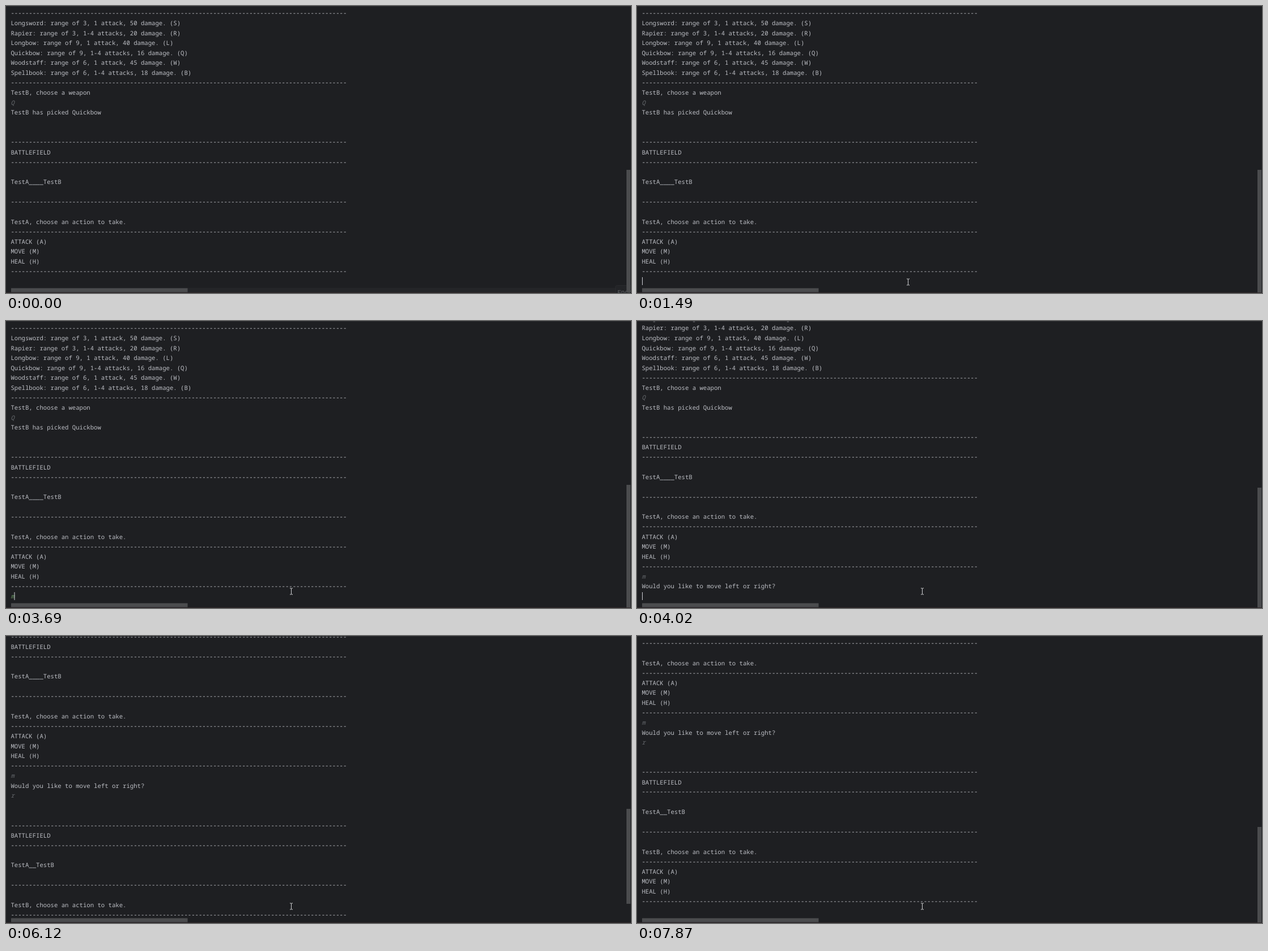
Write an HTML page that moves like this. It is 1103 px wide and 508 px high and loops after 8 s.

```html
<!DOCTYPE html>
<html lang="en">
<head>
<meta charset="utf-8">
<title>Console battle</title>
<style>
  html, body { margin: 0; width: 100%; height: 100%; overflow: hidden; background: #1e1f22; }
  svg { display: block; width: 1103px; height: 508px; }
  #log text { font: 10.64px "Noto Sans Mono", "DejaVu Sans Mono", monospace; fill: #bcbec4; text-rendering: geometricPrecision; }
  #log .echo { font-style: italic; fill: #66696d; }
  #log .typing { fill: #6a9a63; }
  .thumb { fill: #4b4c4e; }
</style>
</head>
<body>
<svg viewBox="0 0 1103 508">
  <g id="log"></g>
  <rect width="1103" height="1" fill="#2a2b2e"/>
  <rect y="507" width="1103" height="1" fill="#30282a"/>
  <g id="hint">
    <rect x="9" y="499" width="1086" height="8" fill="#242528"/>
    <rect x="1075.5" y="494.5" width="40" height="20" rx="3" fill="#232427" stroke="#292a2d"/>
    <text x="1079" y="511" font-family="Inter, sans-serif" font-size="11" fill="#5a5c60">Enco</text>
  </g>
  <rect class="thumb" x="9" y="499.5" width="311.5" height="7"/>
  <rect class="thumb" id="bar" x="1095" width="7"/>
  <rect id="caret" y="480" width="1" height="14" fill="#ced0d6"/>
  <path id="mouse" d="M-2.5-5.5h2l.5.5.5-.5h2M0-5V5M-2.5 5.5h2L0 5l.5.5h2" fill="none" stroke="#d2d3d5"/>
</svg>
<script>
const LOOP = 8000, ROW = 17.58, BASE = 16.4, LEFT = 8.4;
const $ = id => document.getElementById(id);
const rule = "-".repeat(93);

const field = (gap, player) => [
  "", "", rule, "BATTLEFIELD", rule, "", "TestA" + "_".repeat(gap) + "TestB", "", rule, "",
  player + ", choose an action to take.", rule, "ATTACK (A)", "MOVE (M)", "HEAL (H)", rule
];
const lines = [
  rule,
  "Longsword: range of 3, 1 attack, 50 damage. (S)",
  "Rapier: range of 3, 1-4 attacks, 20 damage. (R)",
  "Longbow: range of 9, 1 attack, 40 damage. (L)",
  "Quickbow: range of 9, 1-4 attacks, 16 damage. (Q)",
  "Woodstaff: range of 6, 1 attack, 45 damage. (W)",
  "Spellbook: range of 6, 1-4 attacks, 18 damage. (B)",
  rule, "TestB, choose a weapon", "Q", "TestB has picked Quickbow",
  ...field(4, "TestA"),
  "m", "Would you like to move left or right?", "r",
  ...field(2, "TestB")
];

const rows = lines.map((line, i) => {
  const el = document.createElementNS("http://www.w3.org/2000/svg", "text");
  el.textContent = line;
  el.setAttribute("x", LEFT);
  el.setAttribute("y", BASE + i * ROW - (line === rule ? 0.6 : 0));
  if (line.length === 1) el.classList.add("echo");
  $("log").append(el);
  return el;
});

// start time, visible lines, scroll in rows, scrollbar top and bottom
const views = [
  [0, 27, 0, 290, 507],
  [3690, 28, 0, 290, 507],
  [4020, 29, 2, 295, 507],
  [5810, 30, 2, 295, 507],
  [6120, 42, 13.64, 306, 474],
  [6190, 46, 19, 338, 507]
];
const caretSpans = [[1490, 2440], [2940, 3440], [3690, 4880], [5380, 6120], [6190, 6880], [7360, 7870]];

const within = (t, a, b) => t >= a && t < b;
const show = (el, on) => el.style.display = on ? "" : "none";

// progress from 0 to 1 that changes n times, first at a and last at b
function steps(t, a, b, n) {
  const k = Math.floor((t - a) / (b - a) * (n - 1) + 1e-6) + 1;
  return Math.max(0, Math.min(n, k)) / n;
}
const bezier = (p, a, b, c) => a.map((v, i) =>
  (1 - p) ** 2 * v + 2 * p * (1 - p) * b[i] + p * p * c[i]);

function mouseAt(t) {
  if (t < 1120) {
    const p = steps(t, 230, 920, 12);
    return bezier(p * (1.4 - 0.4 * p), [1103, 530], [740, 330], [484, 481]);
  }
  if (t < 1690) return bezier(steps(t, 1120, 1490, 5), [484, 481], [483, 497], [478.5, 488]);
  return bezier(steps(t, 1690, 1810, 3), [478.5, 488], [492, 484], [503.5, 478.5]);
}

function draw(t) {
  const [, count, scroll, top, bottom] = views.findLast(v => t >= v[0]);
  rows.forEach((el, i) => show(el, i < count && i > scroll - 2));
  rows[27].classList.toggle("typing", t < 4020);
  rows[29].classList.toggle("typing", t < 6120);
  $("log").setAttribute("transform", `translate(0 ${-scroll * ROW})`);
  $("bar").setAttribute("y", top);
  $("bar").setAttribute("height", bottom - top);

  const typed = within(t, 3690, 4020) || within(t, 5810, 6120);
  $("caret").setAttribute("x", typed ? 14.5 : 9);
  show($("caret"), caretSpans.some(([a, b]) => within(t, a, b)));

  show($("hint"), t < 60);
  show($("mouse"), t >= 230);
  $("mouse").setAttribute("transform", `translate(${mouseAt(t).map(v => Math.floor(v) + 0.5)})`);
}

const start = performance.now();
function tick() {
  draw((performance.now() - start) % LOOP);
  requestAnimationFrame(tick);
}
tick();
</script>
</body>
</html>
```
